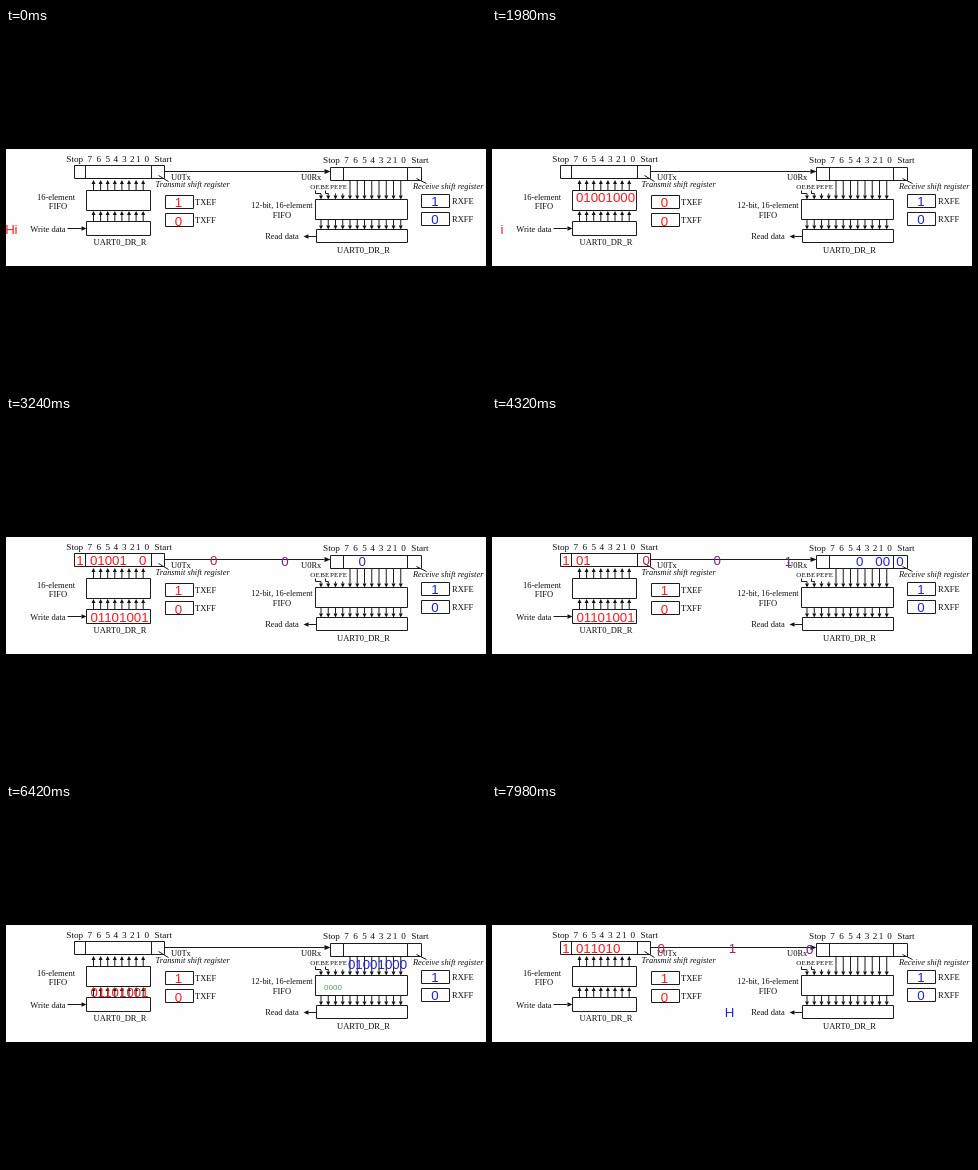
Recreate the animation shown at these times as an HTML page. Size 480 px wide and 360 px high, loop 8000 ms.

```html
<!DOCTYPE html>
<html lang="en">
<head>
<meta charset="utf-8">
<title>UART transmission</title>
<style>
  html, body { margin: 0; width: 100%; height: 100%; overflow: hidden; background: #000; }
  svg { display: block; width: 100%; height: 100%; }
  #diagram text { font: 8.5px "Liberation Serif", "Times New Roman", serif; fill: #111; }
  #diagram .it { font-size: 8.4px; font-style: italic; }
  #diagram .cell { font-size: 9.2px; }
  #diagram .narrow { font-size: 8.3px; }
  #diagram .tiny { font-size: 7px; }
  #diagram path { fill: none; stroke: #1c1c1c; stroke-width: 1; transform: translate(.5px, .5px); }
  #diagram path.head { fill: #111; stroke: none; }
  #live text { font: 13.3px "Liberation Sans", Arial, sans-serif; text-anchor: middle; }
  #live .flags { font-size: 8px; }
</style>
</head>
<body>
<svg viewBox="0 0 480 360">
  <rect width="480" height="360" fill="#000"/>
  <rect y="121" width="480" height="117" fill="#fefefe"/>
  <g id="diagram"></g>
  <g id="live"></g>
</svg>
<script>
const LOOP = 8000, STEP = 60;
const RED = [240, 30, 35], BLUE = [35, 35, 215];
const PITCH = 7.4, TRAVEL = 255, LAG = 298, FLIGHT = 4 * LAG;
const TX = 113.5, RX = 371.5;
const Y = { txShift: 143.8, txFifo: 169.5, txReg: 201, rxShift: 145.6, rxFifo: 182, rxReg: 208 };
const H = "01001000", I = "01101001";

// --- fixed diagram ---
const label = (x, y, s, cls = "", anchor = "middle") =>
  `<text x="${x}" y="${y}" class="${cls}" text-anchor="${anchor}">${s}</text>`;
const line = (x1, y1, x2, y2) => `<path d="M${x1} ${y1}L${x2} ${y2}"/>`;
const box = (x1, y1, x2, y2) => `<path d="M${x1} ${y1}H${x2}V${y2}H${x1}Z"/>`;

function arrow(x1, y1, x2, y2, len = 4, half = 2) {
  const d = Math.hypot(x2 - x1, y2 - y1), ux = (x2 - x1) / d, uy = (y2 - y1) / d;
  const bx = x2 - ux * len, by = y2 - uy * len;
  return line(x1, y1, bx, by) +
    `<path class="head" d="M${x2} ${y2}L${bx - uy * half} ${by + ux * half}L${bx + uy * half} ${by - ux * half}Z"/>`;
}

function shiftRegister(x, y, w, div1, div2, cells, textY) {
  const numbers = [0, 9, 18, 26, 34.5, 42.5, 48.5, 57]
    .map((dx, i) => label(cells + dx, textY, 7 - i, "cell")).join("");
  return box(x, y, x + w, y + 13) + line(div1, y, div1, y + 13) + line(div2, y, div2, y + 13) + numbers +
    label(cells - 15, textY, "Stop", "cell") + label(cells + 73.5, textY, "Start", "cell");
}

function drawDiagram() {
  let s = shiftRegister(68, 137, 90, 79, 145, 83.8, 134) +
          shiftRegister(324, 139, 91, 337, 401, 340.5, 135);
  s += arrow(158, 143, 324, 143, 6, 2.5);
  s += line(152, 147, 162, 153) + line(410, 150, 420, 155);
  s += box(80, 162, 144, 182) + box(80, 193, 144, 207);
  s += box(309, 171, 401, 191) + box(310, 201, 401, 214);
  for (let i = 0; i < 8; i++) {
    const x = 87 + i * 7.1;
    s += arrow(x, 162, x, 151.5) + arrow(x, 193, x, 182.5);
  }
  for (let i = 0; i < 12; i++) {
    const x = 314.5 + i * 7.25;
    s += arrow(x, i < 4 ? 165 : 152, x, 171) + arrow(x, 191, x, 201);
  }
  s += `<path d="M309 162V165H314.5M319 162V165H322"/>`;
  s += arrow(61, 200, 80, 200, 5, 2.3) + arrow(310, 208, 297, 208, 5, 2.3);
  for (const [x, y] of [[159, 167], [159, 185], [415, 166], [415, 184]]) s += box(x, y, x + 28, y + 13);

  s += label(165, 152, "U0Tx", "", "start") + label(295, 152, "U0Rx", "", "start");
  s += label(149.5, 159.3, "Transmit shift register", "it", "start");
  s += label(407, 161.3, "Receive shift register", "it", "start");
  s += label(50, 172, "16-element") + label(52, 181, "FIFO");
  s += label(42, 203.5, "Write data") + label(114, 217, "UART0_DR_R");
  s += label(276, 180.3, "12-bit, 16-element", "narrow") + label(276, 189.5, "FIFO");
  s += label(276, 211.3, "Read data") + label(357.5, 224.5, "UART0_DR_R");
  s += label(189, 177, "TXEF", "", "start") + label(189, 195.3, "TXFF", "", "start");
  s += label(446, 176, "RXFE", "", "start") + label(446, 194, "RXFF", "", "start");
  [["OE", 309], ["BE", 318.7], ["PE", 328.2], ["FE", 336.9]]
    .forEach(([t, x]) => { s += label(x, 161.3, t, "tiny"); });
  document.getElementById("diagram").innerHTML = s;
}

// --- moving values ---
const mix = (a, b, p) => a + (b - a) * p;
const part = (t, from, to) => Math.min(1, Math.max(0, (t - from) / (to - from)));
const slide = (t, from, to, a, b) => mix(a, b, part(t, from, to));
const tint = p => `rgb(${RED.map((c, i) => Math.round(mix(c, BLUE[i], p)))})`;
const value = (x, y, s, p = 0) =>
  `<text x="${x.toFixed(2)}" y="${(y + 4.8).toFixed(2)}" fill="${tint(p)}">${s}</text>`;
const errorBits = y => `<text class="flags" x="327" y="${y + 3}" style="fill:#5c9468">0000</text>`;

// Start bit first, then bits 0 to 7, then the stop bit.
function serial(t, begin, byte) {
  let s = "";
  for (let i = 0; i < 10; i++) {
    const home = i === 0 ? 153 : i === 9 ? 74 : TX + (4.5 - i) * PITCH;
    const bit = i === 0 ? 0 : i === 9 ? 1 : byte[8 - i];
    const p = part(t, begin + i * LAG, begin + i * LAG + FLIGHT);
    s += value(home + TRAVEL * p, mix(Y.txShift, Y.rxShift, p), bit, p);
  }
  return s;
}

function txSide(t) {
  let s = "";
  // first letter
  if (t < 1080) s += value(slide(t, 780, 1080, 4, 84), 201, "H");
  else if (t < 1980) s += value(TX, slide(t, 1440, 1740, Y.txReg, Y.txFifo), H);
  else if (t < 2290) s += value(TX, slide(t, 1980, 2280, Y.txFifo, Y.txShift), H);
  else if (t < 6180) s += serial(t, 2290, H);
  // second letter
  if (t < 2590) s += value(slide(t, 2290, 2590, 10, 84), 201, "i");
  else if (t < 6900) s += value(TX, slide(t, 6300, 6600, Y.txReg, Y.txFifo), I);
  else if (t < 7210) s += value(TX, slide(t, 6900, 7200, Y.txFifo, Y.txShift), I);
  else s += serial(t, 7210, I);
  return s;
}

function rxSide(t) {
  if (t < 6180) return "";
  if (t < 7200) {
    const y = t < 6900 ? slide(t, 6300, 6600, Y.rxShift, Y.rxFifo) : slide(t, 6900, 7200, Y.rxFifo, Y.rxReg);
    return errorBits(Math.max(y, Y.rxFifo + 1)) + value(RX, y, H, 1);
  }
  return value(slide(t, 7200, 7500, 304, 237.5), 208.3, "H", 1);
}

function flags(t) {
  const txFull = (t >= 1740 && t < 2280) || (t >= 6600 && t < 7200);
  const rxFull = t >= 6600 && t < 7200;
  return value(172.5, 174, txFull ? 0 : 1) + value(172.5, 192.7, 0) +
    value(429, 173, rxFull ? 0 : 1, 1) + value(429, 191.3, 0, 1);
}

const live = document.getElementById("live");
let shown = -1;
function frame(now) {
  const t = Math.floor((now % LOOP) / STEP) * STEP;
  if (t !== shown) {
    live.innerHTML = flags(t) + txSide(t) + rxSide(t);
    shown = t;
  }
  requestAnimationFrame(frame);
}

drawDiagram();
frame(0);
</script>
</body>
</html>
```
